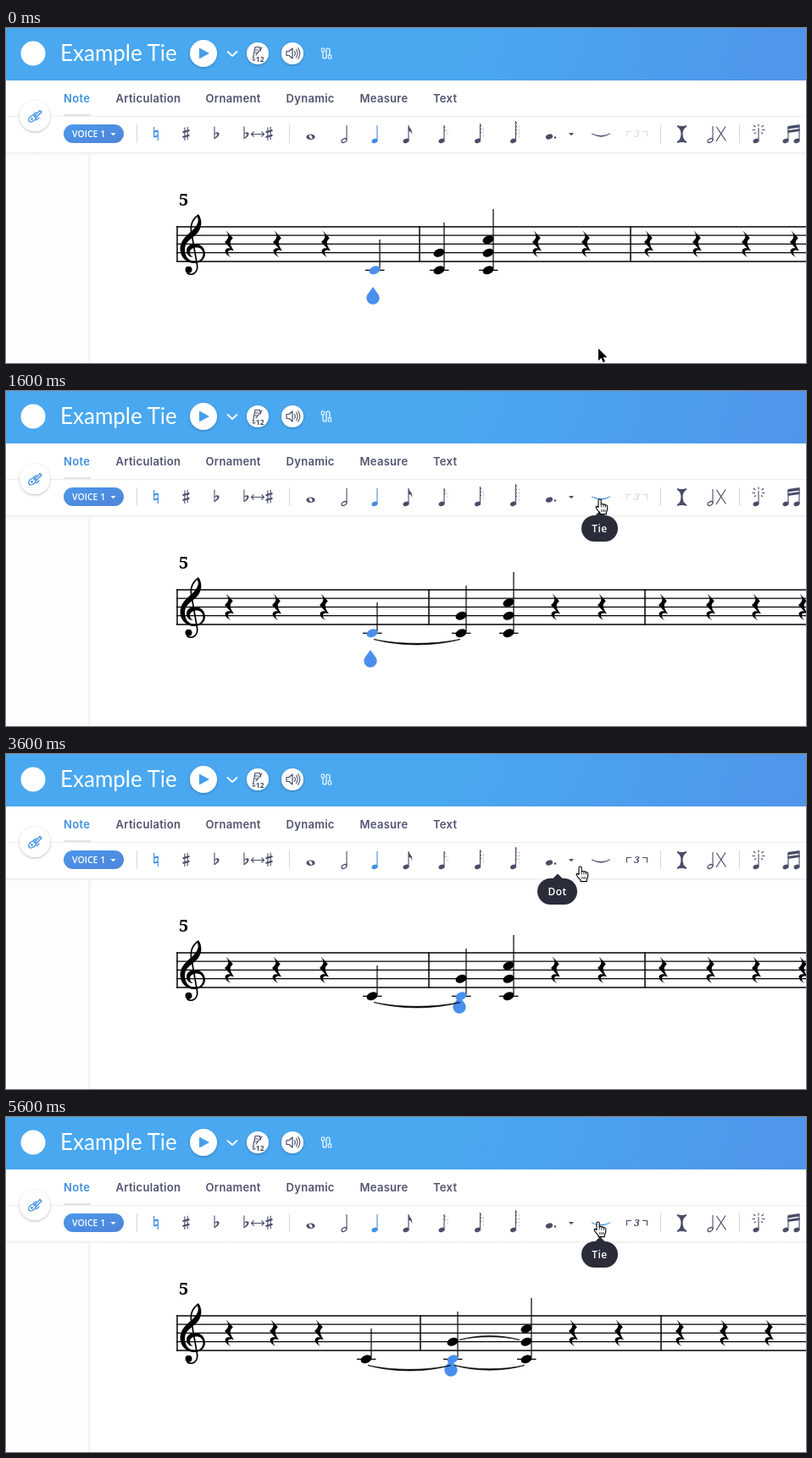
Animation of 944x396 px, one loop 5.8 s. Source, as an HTML page:

```html
<!DOCTYPE html>
<html lang="en">
<head>
<meta charset="utf-8">
<title>Tie demo</title>
<style>
  html, body { margin: 0; width: 100%; height: 100%; overflow: hidden; background: #fff; }
  svg { display: block; width: 944px; height: 396px; }
  .tab { font: 600 13px Inter, sans-serif; letter-spacing: .3px; fill: #50536f; }
  .tip { font: 600 12px "Open Sans", sans-serif; letter-spacing: .4px; fill: #fff; text-anchor: middle; }
</style>
</head>
<body>
<svg id="stage" viewBox="0 0 944 396" xmlns="http://www.w3.org/2000/svg"></svg>
<script>
const INK = '#4a4d68', BLUE = '#4a8fee', ACCENT = '#3f8fe0', PALE = '#dcdde3';
const STEP = 200, LOOP = 5800;

// --- small drawing helpers ---
const path = (d, fill = INK, extra = '') => `<path d="${d}" fill="${fill}" ${extra}/>`;
const line = (d, color = INK, w = 1.2, extra = '') =>
  `<path d="${d}" fill="none" stroke="${color}" stroke-width="${w}" ${extra}/>`;
const circle = (x, y, r, fill, extra = '') => `<circle cx="${x}" cy="${y}" r="${r}" fill="${fill}" ${extra}/>`;
const rect = (x, y, w, h, fill, extra = '') =>
  `<rect x="${x}" y="${y}" width="${w}" height="${h}" fill="${fill}" ${extra}/>`;
const oval = (x, y, rx, ry, fill, turn = -22, extra = '') =>
  `<ellipse rx="${rx}" ry="${ry}" fill="${fill}" transform="translate(${x} ${y}) rotate(${turn})" ${extra}/>`;
const text = (x, y, str, attrs) => `<text x="${x}" y="${y}" ${attrs}>${str}</text>`;
const at = (x, y, body) => `<g transform="translate(${x} ${y})">${body}</g>`;
const group = (id, body) => `<g id="${id}">${body}</g>`;
const round = 'stroke-linecap="round" stroke-linejoin="round"';
const shadow = 'filter="url(#soft)"';

const defs = `<defs>
  <linearGradient id="sky" gradientUnits="userSpaceOnUse" x1="560" y1="-60" x2="960" y2="100">
    <stop offset="0" stop-color="#49a8f0"/><stop offset="1" stop-color="#5093eb"/>
  </linearGradient>
  <linearGradient id="pill" x2="1" y2="1">
    <stop offset="0" stop-color="#4a98ea"/><stop offset="1" stop-color="#5084da"/>
  </linearGradient>
  <linearGradient id="fall" x2="0" y2="1">
    <stop offset="0" stop-color="#e6e7ea"/><stop offset="1" stop-color="#fff" stop-opacity="0"/>
  </linearGradient>
  <filter id="soft" x="-30%" y="-30%" width="160%" height="160%">
    <feDropShadow dx="0" dy="1" stdDeviation="1.6" flood-opacity=".28"/>
  </filter>
</defs>`;

// --- header ---
function header() {
  const metronome = line('M291.5 35.5L294 22.5H299.5L300.5 27M291.5 35.5H293M295 32L302 23M294.5 26H297.5M294 29H296.5', INK, 1.2, round)
    + text(290, 39.5, '÷12', `font-family="Open Sans, sans-serif" font-size="8.5" font-weight="700" fill="${INK}"`);
  const speaker = line('M331 27.5H334L338 24V36L334 32.5H331Z', INK, 1.2, round)
    + line('M340.5 27.5Q342.3 30 340.5 32.5M342.5 25.5Q345.6 30 342.5 34.5M344.6 23.8Q349 30 344.6 36.2', INK, 1.1, round);
  const cable = line('M374 28V34Q374 36 376 36Q378 36 378 34V26Q378 24 380 24Q382 24 382 26V32', '#fff', 1.2)
    + line('M372.3 24H375.7V28H372.3ZM380.3 32H383.7V36H380.3Z', '#fff', 1);
  return rect(0, 0, 944, 62, 'url(#sky)')
    + circle(32, 30, 14.5, '#fff')
    + text(64, 39, 'Example Tie', 'font-family="Lato, sans-serif" font-size="26" fill="#fff"')
    + circle(233, 30, 16, '#fff', shadow) + path('M228.5 24.2L239.2 30L228.5 35.8Z', '#469fea', 'stroke="#469fea" stroke-linejoin="round"')
    + line('M261.5 28L267 33L272.5 28', '#fff', 1.8, round)
    + circle(297, 30, 13, '#fff', shadow) + metronome
    + circle(338, 30, 13, '#fff', shadow) + speaker + cable;
}

// --- toolbar ---
const natural = x => line(`M${x - 2.3} 117V129M${x + 2.3} 121V133`, ACCENT, 1.2)
  + line(`M${x - 2.3} 122.8L${x + 2.3} 121.5M${x - 2.3} 128.7L${x + 2.3} 127.4`, ACCENT, 2);
const sharp = x => line(`M${x - 1.6} 117.5V133M${x + 1.7} 116.8V132.3`, INK, 1.1)
  + line(`M${x - 4} 123.2L${x + 4} 121M${x - 4} 129L${x + 4} 126.8`, INK, 2);
const flat = x => line(`M${x - 2.5} 116.5V131`, INK, 1.1)
  + path(`M${x - 2.5} 125C${x - .5} 122.6 ${x + 3.6} 122.8 ${x + 3} 125.8C${x + 2.5} 128.4 ${x - .5} 129.6 ${x - 2.5} 131.6V130C${x - 1} 128.8 ${x + .9} 127.2 ${x + .8} 125.6C${x + .7} 124.2 ${x - 1} 124.5 ${x - 2.5} 126Z`);

function icon(x, top, flags = 0, color = INK, hollow = false) {
  const head = hollow
    ? oval(x - 3, 133, 3.3, 2.1, 'none', -30, `stroke="${color}" stroke-width="1.2"`)
    : oval(x - 2.9, 133.3, 3.7, 2.6, color);
  let tails = '';
  for (let i = 0; i < flags; i++)
    tails += path(`M${x} ${top + i * 4}c.6 3.4 5.6 5 4 ${flags > 1 ? 8 : 12}c.2-3.6-2-5-4-5.2z`, color);
  return head + line(`M${x} 132.5V${top}`, color, 1.1) + tails;
}

function toolbar() {
  const tabs = [['Note', 68], ['Articulation', 129.5], ['Ornament', 235.5], ['Dynamic', 330.5], ['Measure', 417.5], ['Text', 504]];
  const guitar = oval(31, 107, 4.8, 3.2, 'none', -38, `stroke="${ACCENT}" stroke-width="1.4"`)
    + circle(30.5, 107.4, 1.3, ACCENT)
    + line('M33 105L40 97.5M35 106.5L42 99.2M40 97.5L42 99.2M32 102.5L35.5 99.8M36 108.8L39 106', ACCENT, 1.3, round);
  const sparks = line('M888 113.5V116.5M882 115L884.4 117.2M894 115L891.6 117.2M880.5 120.5H884M892 120.5H895.5M883 125L885 123.3M893 125L891 123.3', INK, 1.1);
  return rect(0, 147, 944, 4, 'url(#fall)')
    + rect(0, 62, 944, 85, '#fff') + rect(0, 104, 944, 1, '#eeeff1')
    + rect(68, 102, 32, 2, '#e3e4e8')
    + tabs.map(([name, x], i) => text(x, 88, name, `class="tab" ${i ? '' : `style="fill:${ACCENT}"`}`)).join('')
    + circle(34, 104, 18, '#fff', shadow) + guitar
    + rect(68, 114, 71, 22, 'url(#pill)', 'rx="11"')
    + text(78, 129, 'VOICE 1', 'font-family="Open Sans, sans-serif" font-size="10.5" font-weight="600" fill="#fff"')
    + path('M123.5 124H129.5L126.5 127.2Z', '#fff')
    + [154, 334, 772, 865].map(x => rect(x, 114, 1, 22, '#d6d8df')).join('')
    + natural(177) + sharp(212.5) + flat(248.5) + flat(283.5) + sharp(310.5)
    + line('M289.5 125.5H304.5M292.5 122.5L289.5 125.5L292.5 128.5M301.5 122.5L304.5 125.5L301.5 128.5', INK, 1.1)
    + oval(359.5, 128.7, 5.1, 3.2, INK, 0) + oval(359.5, 128.7, 2.6, 1.6, '#fff', 55)
    + icon(402, 115, 0, INK, true) + icon(438, 115, 0, ACCENT)
    + icon(475, 115, 1) + icon(517, 115, 2) + icon(559.5, 113, 3) + icon(601.5, 110, 4)
    + oval(641, 128.5, 4.3, 3, INK) + circle(648, 129.5, 1.2, INK) + path('M664 124H670L667 127.2Z')
    + group('tie', path('M691 124.8Q702 132 713 124.8Q702 129.8 691 124.8Z', 'currentColor', 'stroke="currentColor" stroke-width=".6"'))
    + group('tuplet', line('M732.5 128.5V122.5H738M751 122.5H756.5V128.5', 'currentColor', 1.1)
      + text(744.3, 129, '3', 'font-family="Noto Serif, serif" font-size="11.5" font-weight="700" font-style="italic" fill="currentColor" text-anchor="middle"'))
    + path('M792 115Q797.5 117 803 115V117Q798.6 119 798.6 125.5Q798.6 132 803 134V136Q797.5 134 792 136V134Q796.4 132 796.4 125.5Q796.4 119 792 117Z')
    + icon(834, 116, 0, INK, true) + line('M838.5 117L849.5 133.5M849 116.5L838 134', INK, 1.2)
    + icon(888, 118) + sparks
    + icon(923, 117) + icon(936, 115.5)
    + path('M922.5 116L936.5 114V117.4L922.5 119.4ZM922.5 121L936.5 119V122L922.5 124Z');
}

// --- score ---
const STAFF = [235, 245.2, 255.4, 265.7, 276];
const C4 = 286.3, G4 = 265.8, C5 = 250.3;

const clef = path('M227 220C231 225 232 234 227 241C222 248 211 251 211 262C211 271 217 276 223 276C229.5 276 232.5 271 232.5 267C232.5 262 229 259.5 225 259.5C220 259.5 217 262 217 265.5C217 268 218.5 270 221 271C216 271 213 267.5 213 263.5C213 258 217.5 255 223 255C230 255 235 260 235 267C235 273 230 278 222 278C213 278 205.5 271 205.5 261C205.5 250 216 243 221 238C226 233 228 228 226 224Z', '#000')
  + line('M227 221C220 226 217.5 232 218.5 240L225.5 280C227 290 219 293.5 213.5 289.5', '#000', 1.7)
  + circle(215.5, 285.8, 4, '#000');
const rest = x => at(x, 255, path('M-3.5-15.5C0-12 3-9 4.8-6.5C1-3 0-.5 6 8.5C1.5 6.5-1.5 8-1 11C-.7 13 .5 14.5 2 16C-3.5 13-6 9-3.5 6.5C-2 5 0 5 1.8 5.5L-5-2C-1.5-5 0-7.5-1-10.5C-1.5-12.5-2.5-14-3.5-15.5Z', '#000'));
const drop = (x, y) => at(x, y, path('M0 0C3 5 7.7 9 7.7 13A7.7 7.7 0 0 1-7.7 13C-7.7 9-3 5 0 0Z', BLUE));
const slur = (x1, x2, y, bend) => {
  const a = x1 + (x2 - x1) * .3, b = x2 - (x2 - x1) * .3;
  return path(`M${x1} ${y}C${a} ${y + bend} ${b} ${y + bend} ${x2} ${y}C${b} ${y + bend * .76} ${a} ${y + bend * .76} ${x1} ${y}Z`,
    '#000', 'stroke="#000" stroke-width=".7"');
};

function chord(x, top, pitches, lit) {
  return line(`M${x - 11} ${C4}H${x + 11.5}`, '#000', 1.3)
    + line(`M${x + 6} ${C4 - 2}V${top}`, '#000', 1.2)
    + pitches.map(y => oval(x, y, 6.7, 4.6, y === lit ? BLUE : '#000')).join('');
}

const LAYOUTS = [
  { notes: [435, 511, 569], bars: [488, 737], rests: [263, 320, 377, 626, 684, 758, 815, 873, 930], ties: [] },
  { notes: [432, 537, 593], bars: [499, 754], rests: [263, 319, 375, 648, 703, 775, 831, 885, 940], ties: [[434, 536, 293.5, 8.5]] },
  { notes: [425, 527, 614], bars: [489, 773], rests: [263, 316, 369, 669, 723, 795, 847, 900, 953],
    ties: [[427, 525, 293.5, 8.5], [529, 612, 293.5, 7.5], [535, 606, 263.5, -6.5]] },
];

function score({ layout, picked, hover }) {
  const { notes, bars, rests, ties } = LAYOUTS[layout];
  const pitches = [[C4], [G4, C4], [C5, G4, C4]], tops = [250, 230, 214];
  const lit = i => i === picked ? C4 : hover && hover[0] === i ? hover[1] : null;
  return STAFF.map(y => line(`M201 ${y}H944`, '#000', 1.3)).join('')
    + [202, ...bars].map(x => line(`M${x} 234.4V276.6`, '#000', 1.5)).join('')
    + clef + rests.map(rest).join('')
    + drop(notes[picked] - 2, picked ? 286 : 306)
    + notes.map((x, i) => chord(x, tops[i], pitches[i], lit(i))).join('')
    + ties.map(t => slur(...t)).join('');
}

// --- pointer and tooltip ---
const ARROW = path('M0 0V14.2L3.4 11.1L5.6 16.2L8 15.2L5.8 10.2H10.3Z', '#000', 'stroke="#fff" stroke-width="1.3" paint-order="stroke"');
const HAND = path('M-2 9.6V1.5Q-2 0-.4 0Q1.2 0 1.2 1.5V6Q2.4 5 3.9 6.2Q5.2 5.4 6.4 6.9Q8.7 6.4 8.8 8.7L8.6 12Q8.4 14 7.3 15.5V17.6H0V16Q-2.6 13.5-4.6 10.5Q-5.4 8.6-3.8 8.4Q-2.8 8.4-2 9.6Z', '#fff', 'stroke="#000" stroke-width="1.1" stroke-linejoin="round"')
  + line('M1.2 6V9.5M3.9 6.4V9.5M6.4 7V9.8M1.8 12V15M4 12V15M6 12V15', '#000', .8);
const tooltip = (x, w, name) => name
  ? rect(x - w / 2, 147, w, 31, '#2a2c39', 'rx="15.5"') + path(`M${x - 6} 148L${x + .5} 141.5L${x + 7} 148Z`, '#2a2c39')
    + text(x, 167, name, 'class="tip"')
  : '';
const TIPS = { tie: [700.5, 43, 'Tie'], dot: [650.5, 47, 'Dot'] };

// pointer tip per step; the last place is held
const TRAIL = [[699, 379], [715, 372], [770, 350], [829, 300], [815, 235], [765, 170], [712, 140],
  [701, 128], [701, 128], [655, 165], [596, 216], [580, 247], [556, 277], [545, 285], [544.5, 284.5], [544.5, 284.5],
  [592, 214], [645, 134], [678, 133], [694, 126], [699, 124]];

function stateAt(n) {
  const hand = n === 7 || n === 8 || n >= 17;
  return {
    layout: n < 8 ? 0 : n < 21 ? 1 : 2,
    picked: n < 15 ? 0 : 1,
    hover: n === 10 || n === 11 ? [2, C5] : n === 13 || n === 14 ? [1, C4] : null,
    tieOn: (n >= 8 && n < 15) || n >= 21,
    tip: !hand ? null : n === 17 || n === 18 ? 'dot' : 'tie',
    spot: TRAIL[Math.min(n, TRAIL.length - 1)],
    hand,
  };
}

const stage = document.getElementById('stage');
stage.innerHTML = defs + rect(0, 0, 944, 396, '#fff')
  + rect(0, 147, 98, 249, '#fdfdfd') + rect(97, 147, 3, 249, '#f3f4f5')
  + header() + toolbar()
  + text(204, 210, '5', 'font-family="Noto Serif, serif" font-size="20" font-weight="600"')
  + group('score', '') + group('over', '');
const [tie, tuplet, music, over] = ['tie', 'tuplet', 'score', 'over'].map(id => document.getElementById(id));

function draw(n) {
  const s = stateAt(n);
  music.innerHTML = score(s);
  tie.style.color = s.tieOn ? ACCENT : INK;
  tuplet.style.color = s.picked ? INK : PALE;
  over.innerHTML = (s.tip ? tooltip(...TIPS[s.tip]) : '') + at(...s.spot, s.hand ? HAND : ARROW);
}

const start = performance.now();
let shown = 0;
draw(0);
function tick() {
  const n = Math.floor((performance.now() - start) % LOOP / STEP);
  if (n !== shown) draw(shown = n);
  requestAnimationFrame(tick);
}
requestAnimationFrame(tick);
</script>
</body>
</html>
```
